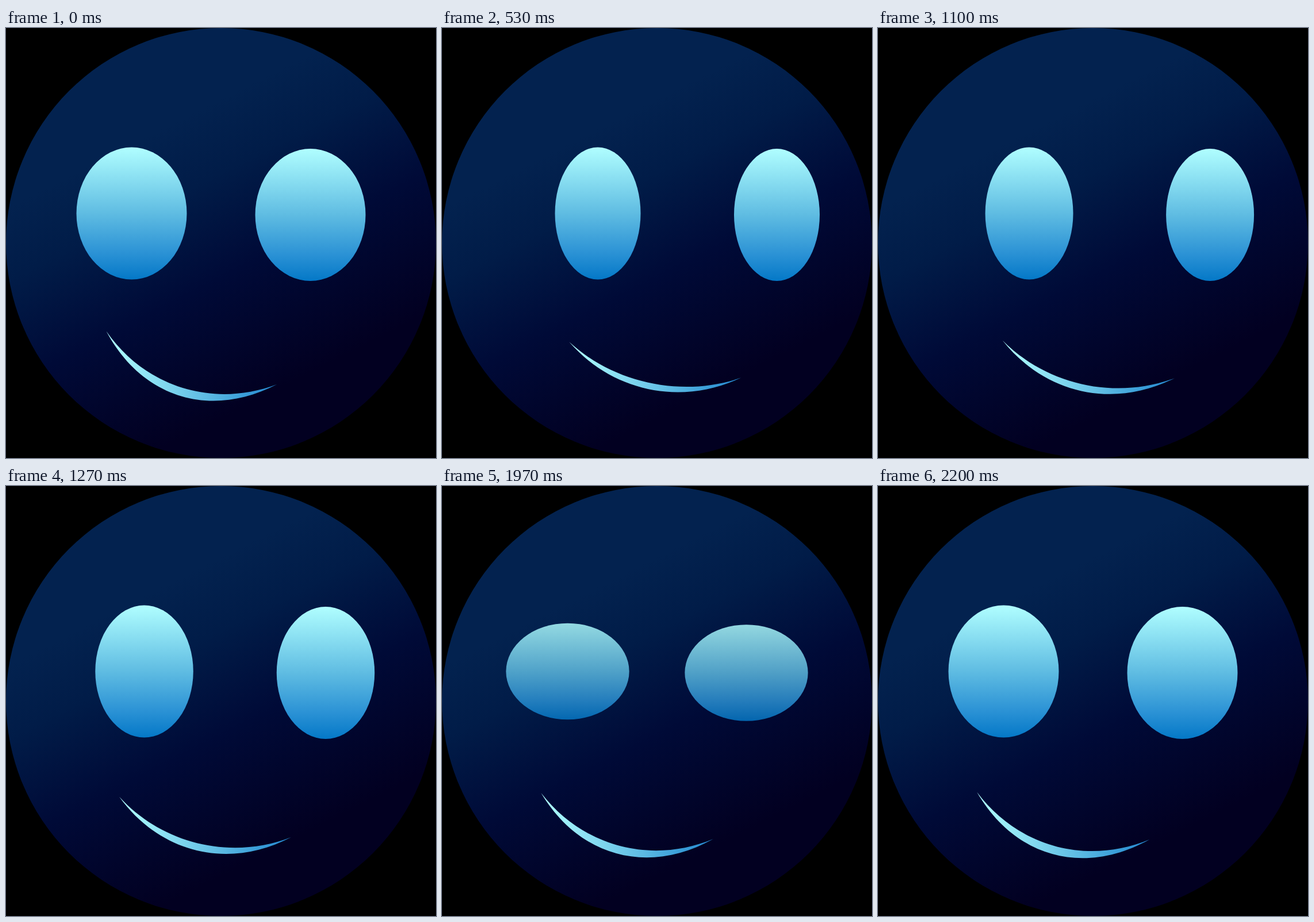
An HTML page that plays this animation: 748 px wide and 748 px high, repeating every 4.01 s.

```html
<!DOCTYPE html>
<html lang="en">
<head>
<meta charset="utf-8">
<title>Smiling face</title>
<style>
  html, body { margin: 0; width: 100%; height: 100%; overflow: hidden; background: #000; }
  svg { display: block; width: 100%; height: 100%; }
</style>
</head>
<body>
<svg viewBox="0 0 748 748">
  <defs>
    <linearGradient id="skin" gradientUnits="userSpaceOnUse" x1="127" y1="249" x2="352" y2="691">
      <stop offset="0" stop-color="#03224f"/>
      <stop offset=".23" stop-color="#011c48"/>
      <stop offset=".56" stop-color="#000a37"/>
      <stop offset="1" stop-color="#020021"/>
    </linearGradient>
    <linearGradient id="glow" x1="0" y1="0" x2="0" y2="1">
      <stop offset="0" stop-color="#b0feff"/>
      <stop offset=".5" stop-color="#5fbce2"/>
      <stop offset=".8" stop-color="#2b92d5"/>
      <stop offset="1" stop-color="#0478c7"/>
    </linearGradient>
    <linearGradient id="lip">
      <stop offset="0" stop-color="#b0feff"/>
      <stop offset=".1" stop-color="#a4f4fb"/>
      <stop offset=".6" stop-color="#5bb9e2"/>
      <stop offset=".8" stop-color="#3b9fd9"/>
      <stop offset="1" stop-color="#2588d0"/>
    </linearGradient>
  </defs>
  <circle cx="374" cy="374" r="374" fill="url(#skin)"/>
  <ellipse id="left" cy="322.5" fill="url(#glow)"/>
  <ellipse id="right" cy="325" fill="url(#glow)"/>
  <path id="mouth" fill="url(#lip)"/>
</svg>
<script>
const LOOP = 4010, LAST = 66;
const [left, right, mouth] = ["left", "right", "mouth"].map(id => document.getElementById(id));

// Mouth poses: time in 1/30 s, chord width, chord rise, chord middle y, depth
const poses = [
  [0, 296.5, 92.5, 573.75, 69],
  [10, 298, 66, 577, 53.6],
  [15, 299, 62.5, 577.2, 52.3],
  [26, 299.5, 61.5, 576.75, 52.8],
  [32, 299.2, 65, 576.4, 55.8],
  [38, 299, 70.5, 575.75, 60],
  [46, 299.4, 78, 574.2, 66.5],
  [49, 299.5, 79, 574, 67.2],
  [59, 299.5, 80, 574, 67.8],
  [66, 300, 82.5, 573.75, 69]
];

function ease(f, from, to) {
  const t = Math.min(1, Math.max(0, (f - from) / (to - from)));
  return t * t * (3 - 2 * t);
}

// 0 at rest, 1 at the far side, 0 again after the return
const trip = (f, reach, leave, back) => ease(f, 0, reach) - ease(f, leave, back);

function slope(i, k) {
  const a = poses[i - 1], b = poses[i + 1];
  return a && b ? (b[k] - a[k]) / (b[0] - a[0]) : 0;
}

function pose(f, k) {
  let i = 0;
  while (i < poses.length - 2 && f > poses[i + 1][0]) i++;
  const a = poses[i], b = poses[i + 1], span = b[0] - a[0];
  const t = (f - a[0]) / span, s = t * t * (3 - 2 * t);
  return a[k] + (b[k] - a[k]) * s
    + span * t * (1 - t) * ((1 - t) * slope(i, k) - t * slope(i + 1, k));
}

function setEye(eye, cx, rx, blink) {
  eye.setAttribute("cx", cx);
  eye.setAttribute("rx", rx * (1 + .283 * blink));
  eye.setAttribute("ry", 115 * (1 - .66 * blink));
  eye.setAttribute("opacity", 1 - .4 * blink);
}

function mouthPath(f) {
  const [w, rise, my, depth] = [1, 2, 3, 4].map(k => pose(f, k));
  const mx = 322.75 - .6 * ease(f, 30, 46) + 48 * trip(f, 14.6, 30, 46);
  const len = Math.hypot(w, rise), cos = w / len, sin = rise / len;
  const at = (u, v) => {
    const x = mx + u * cos - v * sin, y = my + u * sin + v * cos;
    return x.toFixed(2) + " " + y.toFixed(2);
  };
  const c = len / 2, a = .4 * c, outer = depth * 4 / 3, inner = outer * .79;
  return `M${at(-c, 0)}C${at(-a, outer)} ${at(a, outer)} ${at(c, 0)}`
    + `C${at(a, inner)} ${at(-a, inner)} ${at(-c, 0)}Z`;
}

function draw(f) {
  const blink = ease(f, 49, 52) - ease(f, 52, 64.5);
  setEye(left, 218.5 + 52.5 * trip(f, 16, 29, 45.25), 96 - 21.5 * trip(f, 14, 30, 46), blink);
  setEye(right, 529.5 + 53 * trip(f, 16, 30, 46), 96 - 21.5 * trip(f, 15, 30, 46), blink);
  mouth.setAttribute("d", mouthPath(f));
}

// The motion advances in steps of 1/30 s, then rests until the loop ends
const start = performance.now();
function tick(now) {
  const t = Math.max(0, now - start) % LOOP;
  draw(Math.min(LAST, Math.floor((t + 3.34) * .03)));
  requestAnimationFrame(tick);
}
draw(0);
requestAnimationFrame(tick);
</script>
</body>
</html>
```
